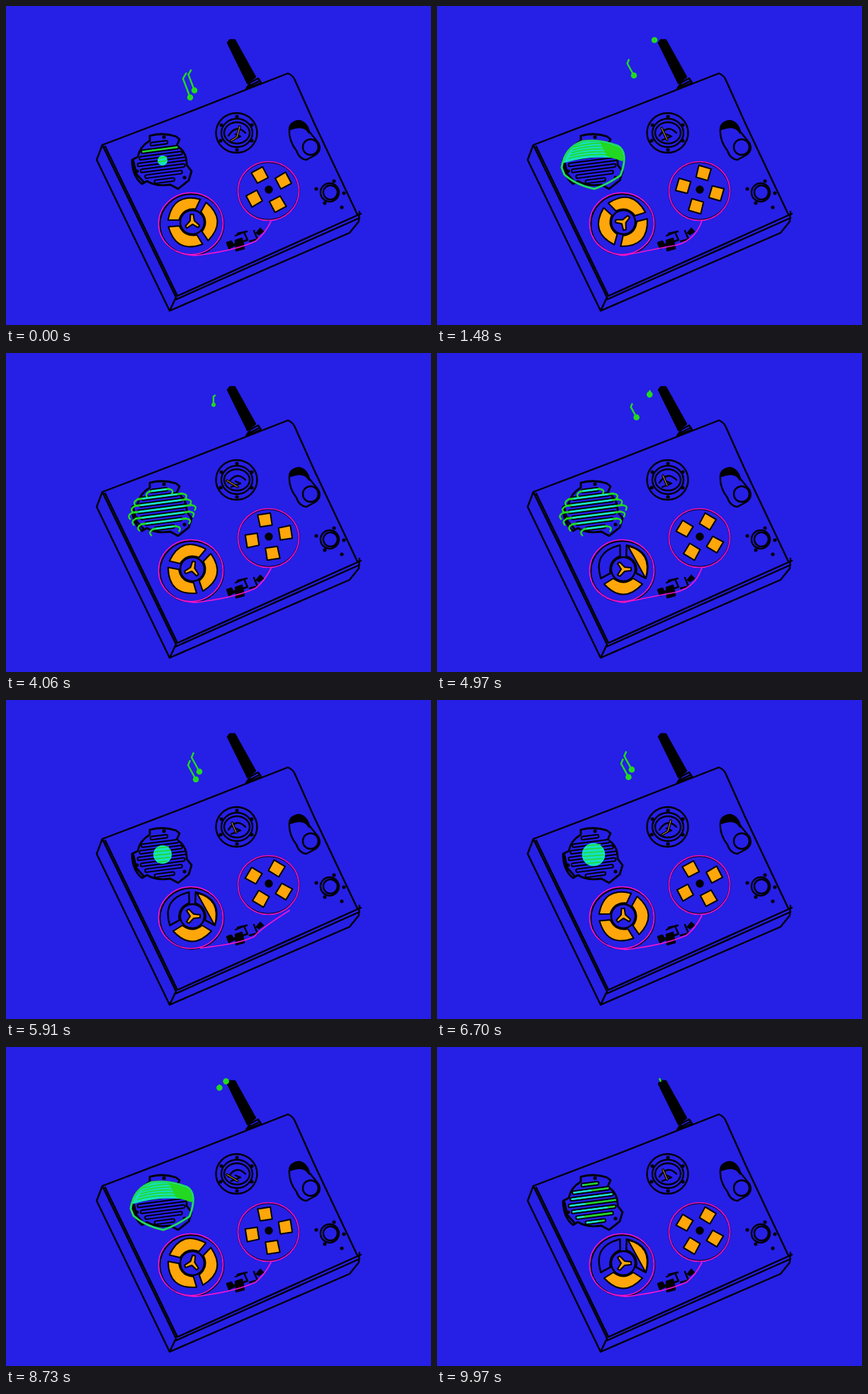
Write an HTML page that moves like this. It is 600x450 px and loops after 10 s.

```html
<!DOCTYPE html>
<html lang="en">
<head>
<meta charset="utf-8">
<title>Tape recorder</title>
<style>
html, body { margin: 0; width: 100%; height: 100%; overflow: hidden; background: #261fe6; }
svg { display: block; width: 600px; height: 450px; fill: none; stroke-linecap: round; stroke-linejoin: round; }
.ink { stroke: #000; stroke-width: 2.4; }
.solid { fill: #000; }
.part { fill: #ffa60a; stroke: #000; stroke-width: 2; }
.bolt { stroke-width: 5; }
.tape { stroke: #f214d2; stroke-width: 1.7; }
.note { stroke: #22d822; stroke-width: 2.5; stroke-linecap: butt; }
</style>
</head>
<body>
<svg viewBox="0 0 600 450">
  <g class="ink">
    <path d="M136 196L252 152 398 95Q406 98 409 107L435 165 496 294M136 196L128 217 231 430 240 411ZM140 198L242 409 501 293M240 414L499 299M231 430L485 320 498 304 499 290"/>
    <path class="solid" d="M313 52L316 48H323L328 57 352 100 341 109Z"/>
    <path d="M339 117L345 108 356 102 360 108ZM343 113L357 106"/>
    <path stroke-width="2.8" d="M203 190V183Q222 178 240 184L245 188 241 197Q256 206 255 224L262 233 258 246 243 258 232 252Q212 255 199 247L192 251Q178 240 178 217L186 213Q189 198 203 190M180 219L184 237 194 248"/>
    <path class="bolt" d="M223 185h.1M185 233h.1M252 242h.1"/>
    <ellipse cx="325.500" cy="179" rx="29" ry="28"/>
    <ellipse cx="326" cy="179" rx="22" ry="20"/>
    <ellipse cx="326" cy="179" rx="18" ry="15"/>
    <path d="M314 183Q325 166 338 179M318 189L331 184 324 181"/>
    <path class="bolt" d="M326 156h.1M304 168h.1M347 168h.1M303 190h.1M347 190h.1M326 203h.1"/>
    <path d="M400 174Q401 163 413 163 425 165 428 177L441 193Q446 203 437 210L424 217Q414 216 410 204 399 190 400 174Z"/>
    <path class="solid" d="M401 174Q404 162 414 162 425 164 428 179 421 166 401 174Z"/>
    <circle cx="430" cy="199" r="11"/>
    <circle cx="457" cy="263" r="13"/><circle cx="458" cy="263" r="10"/>
    <path class="bolt" d="M438 258h.1M463 247h.1M477 264h.1M450 278h.1M474 284h.1"/>
    <path class="solid" d="M312 334L318 332 322 338 315 342ZM324 331L333 328 336 342 325 345ZM354 320L359 314 363 318 357 322Z"/>
    <path d="M317 338L341 330 336 319 324 324M344 332L355 329 350 317M327 321L340 318"/>
    <ellipse cx="262" cy="308" rx="45" ry="43"/>
    <ellipse cx="370.500" cy="261" rx="43" ry="41"/>
    <circle cx="371" cy="259" r="4.500" class="solid"/>
  </g>
  <g id="live"></g>
</svg>
<script>
const live = document.getElementById("live");
const GREEN = "#22d822", CYAN = "#18dcf0", TEAL = "#16e0bd";
const path = (d, attrs = "") => `<path d="${d}" ${attrs}/>`;
const stroke = (d, color, width) => path(d, `stroke="${color}" stroke-width="${width}"`);
const turned = (x, y, angle, body) => `<g transform="translate(${x} ${y}) rotate(${angle})">${body}</g>`;

// The reels and the needle share a cycle of four drawings.
const poses = [
  { left: -33, right: -31, needle: "M318 190L326 185 330 170" },
  { left: -18, right: -12, needle: "M312 180L327 189" },
  { left: 14, right: 13, needle: "M317 172L325 189" },
  { left: 60, right: 28, needle: "M319 173L325 187", halfEmpty: true }
];
const sector = "M-27 -21Q0 -50 27 -21L14 -13Q0 -24 -14 -13Z";
const chord = "M-25 -22Q0 -48 27 -21Z";
const window4 = "M-9 -33L9 -32 8 -15 -9 -16Z";

function drawReels({ left, right, needle, halfEmpty }) {
  let wedges = "", windows = "";
  for (let i = 0; i < 3; i++) {
    const empty = halfEmpty && i !== 1;
    const shape = path(sector, `class="${empty ? "ink" : "part"}"`);
    wedges += turned(0, 0, left + i * 120, shape + (empty && !i ? path(chord, 'class="part"') : ""));
  }
  for (let i = 0; i < 4; i++) windows += turned(0, 0, right + i * 90, path(window4, 'class="part"'));
  const hub = path("M-2 -11H2L3 -2 10 5 8 8 0 3 -8 8 -10 5 -3 -2Z", 'class="part"');
  return turned(263, 305, 0, wedges + '<circle r="17" class="ink"/>' + turned(0, 0, left + 30, hub)) +
    turned(371, 259, 0, windows) + stroke(needle, "#000", 3.5) + stroke(needle, "#d9a32a", 1);
}

const loops = '<g class="tape"><ellipse cx="261" cy="307" rx="45.500" ry="43.500"/><ellipse cx="370.500" cy="261" rx="43" ry="41.500"/></g>';
const links = [
  "M241 346Q260 355 282 350 325 344 352 332 365 322 374 304",
  "M226 335Q241 350 264 352 292 346 329 339 363 335 374 303",
  "M274 350Q329 344 350 334 360 322 400 297"
];

const halfWidths = [10, 24, 28, 32, 29, 24, 12];
const slots = halfWidths.map((w, i) => (from = 0, to = 1) => {
  const x = 216 + i * 1.3, y = 193.5 + i * 8.8;
  const at = f => `${x + w * (2 * f - 1)} ${y - w * 0.13 * (2 * f - 1)}`;
  return `M${at(from)}L${at(to)}`;
});
const grille = slots.map(s => stroke(s(), "#000", 6.5) + stroke(s(), "#261fe6", 2.6)).join("");

const litSlots = k => slots.map((s, i) =>
  stroke(s(), GREEN, 2.6) + stroke(s(0, ((i * 3 + k) % 7) / 6), CYAN, 2)).join("");

// Stripes swell past the frame, with hooked ends.
function wideStripes(grow) {
  const hook = 0.5 * (grow - 1);
  return slots.map((s, i) => {
    const line = s(-hook, 1 + hook);
    const [, a, b] = line.match(/M(.*)L(.*)/);
    return stroke(line, GREEN, 3) + stroke(s(), CYAN, 2) +
      stroke(`M${a}q-8 4 -3 9M${b}q9 1 5 7`, GREEN, 2.4);
  }).join("");
}

function disc(r) {
  let lines = "";
  for (let y = 4 - r; y < r - 1; y += 5) {
    const half = Math.sqrt(r * r - y * y) * 0.9;
    lines += `M${221 - half} ${218 + y}l${2 * half} -2`;
  }
  return `<circle cx="221" cy="218" r="${r}" fill="${TEAL}"/>` + stroke(lines, GREEN, 1.3);
}

function dome() {
  let lines = "";
  for (let i = 0; i < 5; i++) lines += `M${194 - i * 2} ${199 + i * 4}q26 -7 ${49 + i * 3} -5`;
  const rim = "M176 228Q180 200 205 191 232 187 258 199 270 211 259 239 240 252 222 258 195 252 180 238Z";
  return path("M177 222Q184 198 205 191 230 187 256 196 267 203 265 217 222 208 177 222Z", `fill="${TEAL}"`) +
    path("M229 190Q257 192 265 212L262 219 240 212Z", `fill="${GREEN}"`) +
    stroke(lines, GREEN, 1.4) + stroke(rim, GREEN, 3) + stroke(rim, CYAN, 0.8);
}

function drawSpeaker(k) {
  if (k < 14) return disc(7 + k * 1.8) + (k < 3 ? stroke(slots[1](), GREEN, 2.5) : "");
  if (k < 26) return dome();
  if (k < 41) return litSlots(k);
  if (k < 63) return wideStripes(Math.min(1.3, 1 + (k - 41) * 0.04));
  if (k < 101) return disc(13 + (k - 71) * 7 / 19);
  return k < 110 ? dome() : litSlots(k);
}

// Each key: step, head position, stem size. Notes vanish into the antenna.
const DOT = [307, 48, 0], INSIDE = [316, 49, 0];
const notes = [
  [[0, 260, 129, 1.25], [18, 278, 98, 0.85], [27, ...DOT], [35, ...INSIDE], [43, ...INSIDE], [49, 293, 73, 0.5],
    [71, 268, 112, 1], [90, 273, 105, 0.9], [108, ...DOT], [120, ...INSIDE]],
  [[0, 266, 119, 1.05], [18, ...DOT], [22, ...INSIDE], [51, ...INSIDE], [56, ...DOT],
    [71, 273, 101, 1], [90, 277, 95, 0.9], [103, ...DOT], [108, ...INSIDE], [120, ...INSIDE]]
];

function drawNote(keys, k) {
  const i = Math.max(1, keys.findIndex(key => key[0] >= k));
  const a = keys[i - 1], b = keys[i], f = (k - a[0]) / (b[0] - a[0]);
  const [, x, y, size] = a.map((v, j) => v + (b[j] - v) * f);
  if (x > 312) return "";
  const lean = size < 0.6 ? 28 : size > 1 ? 8 : 0;
  return turned(x, y, lean, path(`M0 0L${-11 * size} ${-20 * size}l${3 * size} ${-7 * size}`, 'class="note"') +
    `<circle r="${size > 0.4 && size < 0.6 ? 3 : 4.3}" fill="${GREEN}"/>`);
}

function drawSpark(k) {
  if (k > 116) return path("M314 44l2 5", 'class="note"');
  return k > 28 && k < 45 ? path("M308 43q5 0 8 6", 'class="note"') : "";
}

let start;
function draw(now) {
  start ??= now;
  const t = (now - start) % 10000;
  const k = Math.min(119, Math.floor((t + 26) * 0.012)); // twelve drawings a second
  const sway = (t * 0.0015) % 1;
  const link = sway > 0.9 || sway < 0.16 ? 0 : sway < 0.55 ? 1 : 2;
  live.innerHTML = grille + drawReels(poses[k % 4]) + loops + path(links[link], 'class="tape"') +
    drawSpeaker(k) + notes.map(keys => drawNote(keys, k)).join("") + drawSpark(k);
  requestAnimationFrame(draw);
}
requestAnimationFrame(draw);
</script>
</body>
</html>
```
